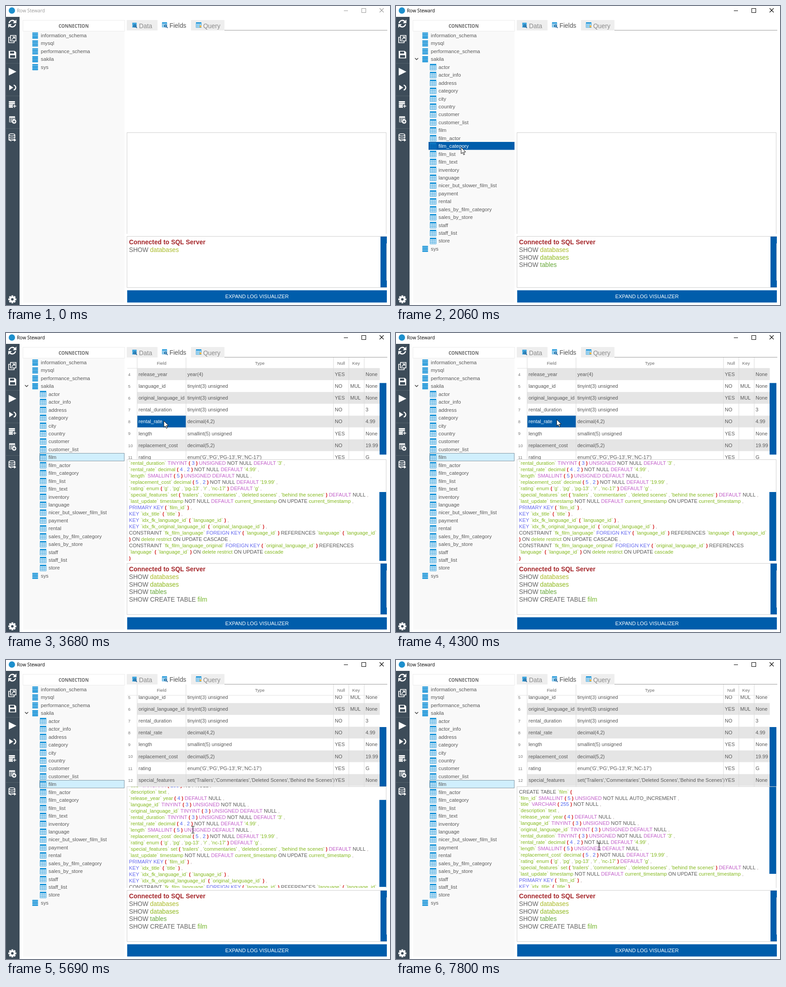
These frames come from a looping animation (849x660 px, 8 s). An HTML page with a canvas:

```html
<!DOCTYPE html>
<html lang="en">
<head>
<meta charset="utf-8">
<title>Row Steward</title>
<style>
html, body { margin: 0; width: 100%; height: 100%; overflow: hidden; background: #fff }
canvas { display: block }
</style>
</head>
<body>
<canvas id="stage" width="849" height="660"></canvas>
<script>
const c = document.getElementById('stage').getContext('2d');
const LOOP = 8000, TICK = 77.2;
const BLUE = '#005dab', ICON = '#1b95d9', INK = '#595959', LINE = '#d0d0d0';
const SANS = '"Liberation Sans", Arial, sans-serif';

const databases = ['information_schema', 'mysql', 'performance_schema', 'sakila', 'sys'];
const tables = `actor actor_info address category city country customer customer_list film film_actor
  film_category film_list film_text inventory language nicer_but_slower_film_list payment rental
  sales_by_film_category sales_by_store staff staff_list store`.split(/\s+/);

const fields = `film_id|smallint(5) unsigned|NO|PRI|None
title|varchar(255)|NO|MUL|None
description|text|YES||None
release_year|year(4)|YES||None
language_id|tinyint(3) unsigned|NO|MUL|None
original_language_id|tinyint(3) unsigned|YES|MUL|None
rental_duration|tinyint(3) unsigned|NO||3
rental_rate|decimal(4,2)|NO||4.99
length|smallint(5) unsigned|YES||None
replacement_cost|decimal(5,2)|NO||19.99
rating|enum('G','PG','PG-13','R','NC-17')|YES||G
special_features|set('Trailers','Commentaries','Deleted Scenes','Behind the Scenes')|YES||None`
  .split('\n').map(row => row.split('|'));

const sql = `CREATE TABLE \`film\` (
\`film_id\` SMALLINT ( 5 ) UNSIGNED NOT NULL AUTO_INCREMENT ,
\`title\` VARCHAR ( 255 ) NOT NULL ,
\`description\` text ,
\`release_year\` year ( 4 ) DEFAULT NULL ,
\`language_id\` TINYINT ( 3 ) UNSIGNED NOT NULL ,
\`original_language_id\` TINYINT ( 3 ) UNSIGNED DEFAULT NULL ,
\`rental_duration\` TINYINT ( 3 ) UNSIGNED NOT NULL DEFAULT '3' ,
\`rental_rate\` decimal ( 4 , 2 ) NOT NULL DEFAULT '4.99' ,
\`length\` SMALLINT ( 5 ) UNSIGNED DEFAULT NULL ,
\`replacement_cost\` decimal ( 5 , 2 ) NOT NULL DEFAULT '19.99' ,
\`rating\` enum ( 'g' , 'pg' , 'pg-13' , 'r' , 'nc-17' ) DEFAULT 'g' ,
\`special_features\` set ( 'trailers' , 'commentaries' , 'deleted scenes' , 'behind the scenes' ) DEFAULT NULL ,
\`last_update\` timestamp NOT NULL DEFAULT current_timestamp ON UPDATE current_timestamp ,
PRIMARY KEY ( \`film_id\` ) ,
KEY \`idx_title\` ( \`title\` ) ,
KEY \`idx_fk_language_id\` ( \`language_id\` ) ,
KEY \`idx_fk_original_language_id\` ( \`original_language_id\` ) ,
CONSTRAINT \`fk_film_language\` FOREIGN KEY ( \`language_id\` ) REFERENCES \`language\` ( \`language_id\`
) ON delete restrict ON UPDATE CASCADE ,
CONSTRAINT \`fk_film_language_original\` FOREIGN KEY ( \`original_language_id\` ) REFERENCES
\`language\` ( \`language_id\` ) ON delete restrict ON UPDATE cascade
)`.split('\n').map(line => line.match(/`[^`]*`|'[^']*'|\w+|\S|\s+/g));

// Pointer path: tick, x, y
const path = [[0, 330, 632], [3, 200, 430], [6, 135, 210], [8, 112, 104], [10, 108, 120], [17, 108, 120],
  [24, 144, 312], [27, 108, 268], [34, 113, 272], [36, 130, 290], [38, 220, 306], [41, 320, 150],
  [42, 335, 30], [45, 349, 194], [46, 352, 192], [59, 358, 190], [63, 360, 195], [67, 413, 374],
  [80, 414, 376], [83, 472, 470], [86, 449, 556], [93, 449, 556], [95, 449, 412]];
// Wheel notches: tick, value
const tableWheel = [[0, 0], [45, 3], [46, 5], [50, 3], [54, 0], [59, 3], [60, 5]];
const sqlWheel = [[0, 101], [71, 41], [73, 0], [77, 60], [78, 101], [94, 81], [96, 41], [98, 0]];

const stepAt = (steps, k) => steps.filter(s => s[0] <= k).pop()[1];

function pointerAt(k) {
  const i = path.findIndex(p => p[0] > k);
  if (i < 0) return path[path.length - 1].slice(1);
  const [a, ax, ay] = path[i - 1], [b, bx, by] = path[i], u = (k - a) / (b - a);
  return [ax + (bx - ax) * u, ay + (by - ay) * u];
}

function rect(x, y, w, h, fill) { c.fillStyle = fill; c.fillRect(x, y, w, h); }
function frame(x, y, w, h, color) {
  c.strokeStyle = color; c.lineWidth = 1; c.strokeRect(x + .5, y + .5, w - 1, h - 1);
}
function line(color, width, ...pts) {
  c.strokeStyle = color; c.lineWidth = width;
  c.beginPath(); pts.forEach(p => c.lineTo(...p)); c.stroke();
}
function polygon(fill, ...pts) {
  c.fillStyle = fill; c.beginPath(); pts.forEach(p => c.lineTo(...p)); c.closePath(); c.fill();
}
function circle(x, y, r, fill) { c.fillStyle = fill; c.beginPath(); c.arc(x, y, r, 0, 7); c.fill(); }
function text(s, x, middle, size, color = INK, { weight = '', align = 'left', font = SANS } = {}) {
  c.font = `${weight} ${size}px ${font}`;
  c.textAlign = align; c.fillStyle = color;
  c.fillText(s, x, middle + size * .36);
  return x + c.measureText(s).width;
}
function clipped(x, y, w, h, draw) {
  c.save(); c.beginPath(); c.rect(x, y, w, h); c.clip(); draw(); c.restore();
}

function dbIcon(x, y, color, size = 13) {
  c.fillStyle = color;
  for (let i = 0; i < 4; i++) {
    c.beginPath(); c.roundRect(x, y - size / 2 + i * size * .27, size, size * .22, size * .1); c.fill();
  }
}
function gridIcon(x, y, color, size = 14, back = '#fff') {
  const top = y - size / 2, cell = (size - 4) / 3;
  rect(x, top, size, size, color);
  for (let i = 0; i < 9; i++)
    rect(x + 1 + (i % 3) * (cell + 1), top + size * .25 + (i / 3 | 0) * size * .25, cell, size * .18, back);
}
function lens(x, y) {
  c.strokeStyle = '#17598f'; c.lineWidth = 1.4;
  c.beginPath(); c.arc(x, y, 2.4, 0, 7); c.stroke();
  line('#17598f', 1.6, [x + 2, y + 2], [x + 4.5, y + 4.5]);
}
function plus(x, y, color, r = 3) {
  line(color, 1.6, [x - r, y], [x + r, y]); line(color, 1.6, [x, y - r], [x, y + r]);
}

function titleBar(active) {
  const color = active ? '#000' : '#999';
  circle(13, 10, 7, '#1d8fcc');
  text('Row Steward', 24, 10.5, 10.3, color, { font: '"Open Sans", sans-serif' });
  line(color, 1, [747, 10.5], [756, 10.5]);
  frame(786, 5, 10, 10, color);
  line(color, 1.1, [826, 5], [835, 14]);
  line(color, 1.1, [835, 5], [826, 14]);
}

function toolbar() {
  const w = '#fff', bar = '#3d4c59';
  rect(0, 24, 30, 636, bar);
  [126, 198, 270].forEach(y => rect(0, y, 30, 1, '#53616b'));
  c.strokeStyle = w; c.lineWidth = 2.6;
  [0, Math.PI].forEach(a => { c.beginPath(); c.arc(14, 39, 7.2, a + .15, a + 2.6); c.stroke(); });
  polygon(w, [23, 30], [23, 38], [15, 38]);
  polygon(w, [5, 48], [5, 40], [13, 40]);
  line(w, 1.7, [10, 69], [6, 69], [6, 81], [18, 81], [18, 77]);
  line(w, 1.7, [10, 65], [22, 65], [22, 77], [10, 77], [10, 64.2]);
  line(w, 1.7, [12.5, 74.5], [19, 68]);
  line(w, 1.7, [14.5, 68], [19, 68], [19, 72.5]);
  polygon(w, [6, 99], [19, 99], [22.5, 102], [22.5, 115.5], [6, 115.5]);
  rect(9, 100.5, 9, 4.5, bar); rect(9, 108.5, 11, 5.5, bar);
  polygon(w, [6, 136.5], [23, 145], [6, 153.5]);
  polygon(w, [7, 174], [16, 180], [7, 186]);
  c.strokeStyle = w; c.lineWidth = 2.4;
  c.beginPath(); c.arc(16, 180, 5.5, -1.4, 1.4); c.stroke();
  dbIcon(6, 217, w, 14);
  circle(19, 221, 4.5, bar); plus(19, 221, w, 3.6);
  gridIcon(7, 250, w, 13, bar);
  circle(18, 255, 4.8, w); plus(18, 255, bar, 2.6);
  c.strokeStyle = w; c.lineWidth = 1.6;
  c.beginPath(); c.ellipse(13, 284.5, 6.5, 2.5, 0, 0, 7); c.stroke();
  [289, 293].forEach(y => { c.beginPath(); c.ellipse(13, y, 6.5, 2.5, 0, 0, Math.PI); c.stroke(); });
  line(w, 1.6, [6.5, 284], [6.5, 296], [12, 298]);
  line(w, 1.6, [19.5, 284], [19.5, 292]);
  line(w, 1.8, [13, 296], [19, 296]);
  polygon(w, [18, 292.5], [22.5, 296], [18, 299.5]);
  c.save(); c.translate(14, 647.5);
  for (let i = 0; i < 8; i++) { c.rotate(Math.PI / 4); rect(-2, -8.8, 4, 6, w); }
  c.restore();
  circle(14, 647.5, 6.6, w); circle(14, 647.5, 2.8, bar);
}

function tree(k, x, y) {
  rect(38, 56, 224, 599, '#f9f9f9');
  frame(37, 31, 226, 25, '#ececec');
  text('CONNECTION', 149.5, 44, 9.8, '#686868', { weight: 'bold', align: 'center', font: '"Noto Sans", sans-serif' });
  const open = k >= 17, hovering = (k >= 0 && k < 15) || (k > 17 && k < 28);
  const rows = databases.map(name => ({ name, db: true }));
  if (open) {
    rows.splice(4, 0, ...tables.map(name => ({ name })));
    line('#444', 1.5, [42, 115], [45.5, 118.5], [49, 115]);
  }
  rows.forEach(({ name, db }, i) => {
    const middle = 65 + 17.44 * i, left = db ? 55 : 72;
    const hover = hovering && x >= left && x < 262 && Math.abs(y - middle) < 8.72;
    if (hover) rect(left, Math.round(middle - 8.7), 262 - left, 17.5, BLUE);
    if (k >= 28 && name === 'film') {
      rect(74, 265, 188, 17.5, '#d0effd');
      c.setLineDash([1, 1]); frame(74, 265, 188, 18, '#30414c'); c.setLineDash([]);
    }
    const icon = hover ? '#0d79c4' : ICON;
    db ? dbIcon(58, middle, icon) : gridIcon(75, middle, icon, 14, hover ? BLUE : '#fff');
    text(name, db ? 77 : 94, middle, 11.25, hover ? '#fff' : INK);
  });
}

function tabs() {
  rect(267, 31, 68, 23, '#eee'); rect(409, 31, 74, 23, '#eee');
  rect(483, 53, 360, 1, '#999');
  dbIcon(279, 42, ICON, 10); lens(285, 44);
  gridIcon(345, 41.5, ICON, 11); lens(353, 44);
  gridIcon(420, 42, ICON, 12); rect(428, 43, 4, 4, '#f0b849');
  text('Data', 294, 43.5, 13.9, '#8b8b8b');
  text('Fields', 361.5, 43, 13.9, '#555');
  text('Query', 436, 43.5, 13.9, '#8b8b8b');
}

function fieldTable(k, x, y) {
  const value = stepAt(tableWheel, k), scroll = Math.min(value * 26.12, 113.5);
  const edges = [290, 398, 724, 758, 792];
  clipped(268, 78, 558.5, 201, () => fields.forEach((row, i) => {
    const top = 78 + 26.12 * i - scroll, middle = top + 13;
    rect(290, top, 537, 26.12, i % 2 ? '#e5e5e5' : '#fff');
    text(i + 1, 270, middle + .5, 9.3, '#777');
    const hover = x > 290 && x < 398 && y > 78 && y < 279 && y >= top && y < top + 26.12;
    if (hover) rect(290, top, 108, 26.12, BLUE);
    row.forEach((cell, j) => text(cell, edges[j] + 3, middle, 11, hover && !j ? '#fff' : INK));
  }));
  edges.forEach(e => rect(e - .5, 54, 1, 225, '#dadada'));
  rect(268, 77.5, 558, 1, '#e2e2e2');
  [['Field', 344], ['Type', 561], ['Null', 741], ['Key', 774]].forEach(([s, at]) =>
    text(s, at, 66, 9.8, '#6b6b6b', { align: 'center' }));
  clipped(826, 54, 15, 225, () => rect(826, 54 + 18.8 * value, 15, 158, BLUE));
}

function sqlColor(word) {
  if (/^[()]$/.test(word)) return '#d21f1f';
  if (word === ',') return '#b5a5a5';
  if (/^\d+$/.test(word)) return '#4b63f0';
  if (/^(PRIMARY|FOREIGN|KEY)$/.test(word)) return '#6267ee';
  if (/^(SMALLINT|TINYINT|VARCHAR|UNSIGNED|DEFAULT)$/.test(word)) return '#c15fc9';
  return /^[A-Z]/.test(word) ? INK : '#84b91f';
}

function sqlView(k) {
  const scroll = stepAt(sqlWheel, k);
  clipped(269, 280, 572, 223, () => {
    sql.forEach((words, i) => {
      let x = 272;
      for (const word of words)
        x = text(word, x, 290.5 + 13.98 * i - scroll, 11.2, sqlColor(word), { weight: /^[()]$/.test(word) ? 'bold' : '' });
    });
    rect(825.5, 280 + scroll * .703, 15, 192, BLUE);
  });
}

function log(k, pointerY) {
  frame(267, 508, 575, 114, LINE);
  rect(828, 509, 14, 112, BLUE);
  rect(841, 524, 1, 82, LINE);
  text('Connected to SQL Server', 272, 521, 13.94, '#a5272b', { weight: 'bold' });
  [['SHOW ', 'databases', '#aabb2a', -1], ['SHOW ', 'databases', '#8fb91e', 15],
   ['SHOW ', 'tables', '#65a737', 17], ['SHOW CREATE TABLE ', 'film', '#76b72c', 30]]
    .forEach(([command, name, color, since], i) => {
      if (k < since) return;
      const y = 538 + 16.7 * i;
      text(name, text(command, 272, y, 13.75, '#646464'), y, 13.75, color);
    });
  const hover = k >= 0 && pointerY > 627 && pointerY < 654;
  rect(268, 627.5, 574, 27, hover ? '#0a6ebd' : BLUE);
  text('EXPAND LOG VISUALIZER', 555, 641, 11.2, '#fff', { align: 'center' });
}

function pointer(x, y) {
  if (x > 268 && y > 280 && y < 621) {
    [[-3.5, 3.5, -7.5], [-3.5, 3.5, 7.5]].forEach(([a, b, dy]) => line('#222', 1, [x + a, y + dy], [x + b, y + dy]));
    line('#222', 1.2, [x, y - 7.5], [x, y + 7.5]);
    return;
  }
  const shape = [[0, 0], [0, 14.2], [3.2, 11.2], [5.6, 16.5], [7.8, 15.5], [5.5, 10.4], [10, 10.2], [0, 0]]
    .map(([dx, dy]) => [x + dx, y + dy]);
  polygon('#fff', ...shape);
  line('#111', 1, ...shape);
}

function draw(t) {
  const k = t < 210 ? -1 : Math.floor((t - 210) / TICK + .25);
  const [x, y] = k < 0 ? [-99, -99] : pointerAt(k);
  rect(0, 0, 849, 660, '#fff');
  titleBar(k >= 12);
  toolbar();
  tree(k, x, y);
  tabs();
  if (k >= 30) fieldTable(k, x, y);
  rect(267, 279, 574, 1, LINE);
  rect(267, 279, 1, 224, LINE);
  rect(840, 279, 1, 224, LINE);
  if (k >= 30) sqlView(k);
  log(k, y);
  if (k >= 0) pointer(x, y);
}

const start = performance.now();
(function loop() {
  draw((performance.now() - start) % LOOP);
  requestAnimationFrame(loop);
})();
</script>
</body>
</html>
```
